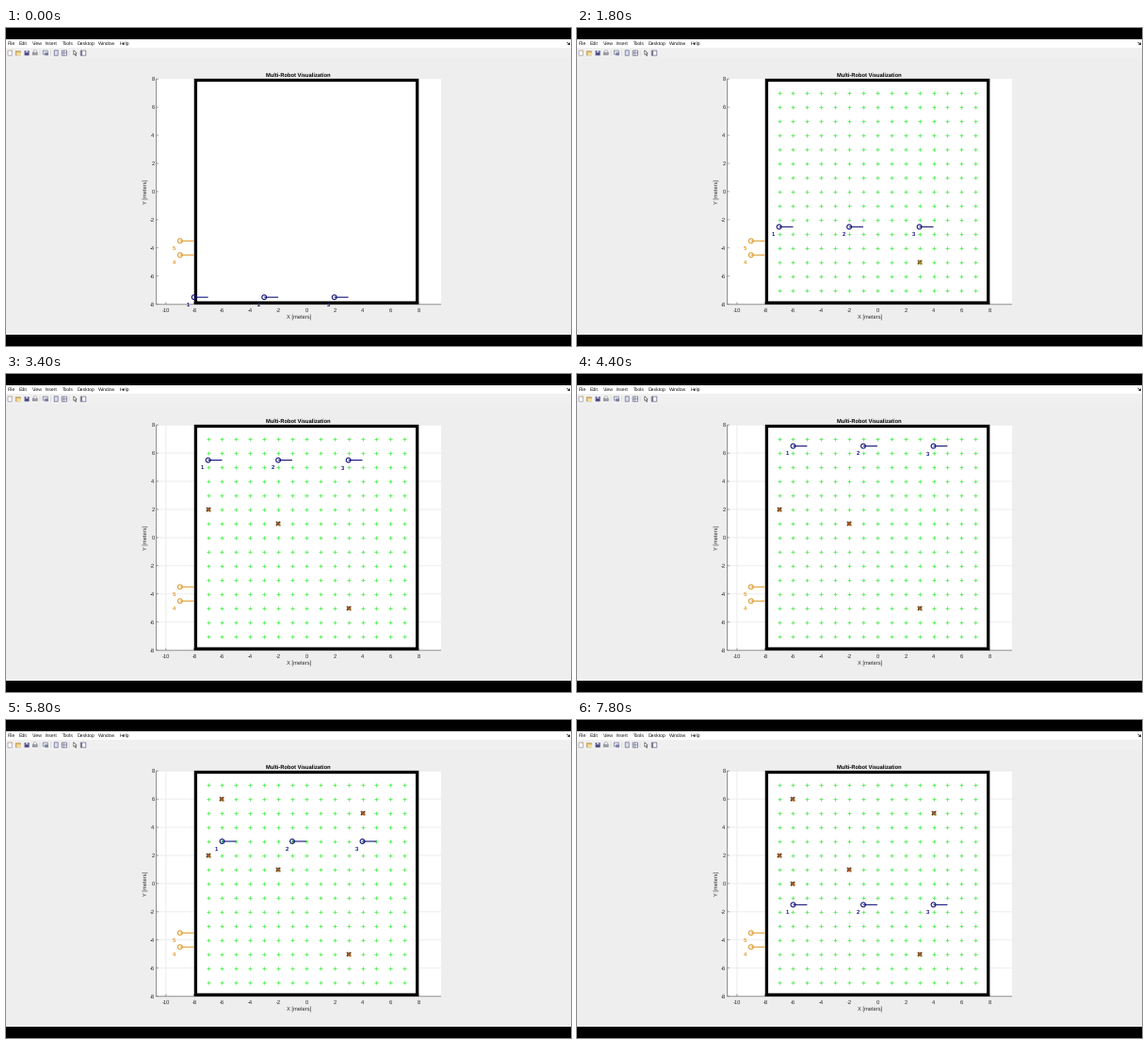
Write a matplotlib script that moves like this. It is 600x338 px and loops after 8000 ms.

```python
import matplotlib.pyplot as plt
from matplotlib.animation import FuncAnimation
from matplotlib.patches import Circle, Polygon, Rectangle

W, H, DPI = 600, 338, 64
PT = 72 / DPI  # points per pixel
FRAMES, STEP = 40, 200

NAVY, ORANGE, GREEN = "#12127a", "#e09d33", "#62f062"
PANEL, GRID, AXIS = "#eeeeee", "#e9e9e9", "#777777"
INK = "#2b2b2b"
LEFT, RIGHT, TOP, BOTTOM = 159.4, 462, 54, 293.8

plt.rcParams["text.hinting"] = "none"
plt.rcParams["font.family"] = "Liberation Sans"

fig = plt.figure(figsize=(W / DPI, H / DPI), dpi=DPI, facecolor=PANEL)
ax = fig.add_axes([0, 0, 1, 1])
ax.set_xlim(0, W)
ax.set_ylim(H, 0)
ax.axis("off")


def px(x):
    return 318.9 + 14.9 * x


def py(y):
    return 173.9 - 14.97 * y


def rect(x0, y0, x1, y1, color, edge="none", lw=0, z=1):
    ax.add_patch(Rectangle((x0, y0), x1 - x0, y1 - y0, facecolor=color,
                           edgecolor=edge, lw=lw * PT, zorder=z, snap=False))


def line(xs, ys, color, lw=1.0, z=2):
    return ax.plot(xs, ys, color=color, lw=lw * PT, zorder=z,
                   solid_capstyle="butt", snap=False)[0]


def marks(xs, ys, marker, size, lw, color, z):
    return ax.plot(xs, ys, ls="", marker=marker, ms=size * PT, mew=lw * PT,
                   color=color, zorder=z, snap=False)[0]


def text(x, y, s, size, color=INK, ha="center", va="baseline", z=4, **kw):
    return ax.text(x, y, s, fontsize=size * PT, color=color, ha=ha, va=va,
                   zorder=z, **kw)


def draw_window():
    rect(0, 0, W, 12, "black")
    rect(0, 326, W, H, "black")
    rect(0, 12, W, 21, "white")
    rect(0, 21, W, 32, "#f0f0f0")
    menus = {"File": 2, "Edit": 14, "View": 28, "Insert": 42, "Tools": 60,
             "Desktop": 76, "Window": 98, "Help": 121}
    for name, x in menus.items():
        text(x, 18.4, name, 5.15, "#111111", ha="left")
    line([595.5, 598], [15, 17], "#333333", 0.8)
    ax.add_patch(Polygon([(598.6, 15), (598.6, 17.8), (596, 17.8)],
                         color="#333333", lw=0))


def draw_toolbar():
    edge = "#77758f"
    for x in (36, 47.5, 67):
        line([x, x], [23.5, 29.5], "#d4d4d4", 0.7)
    # new, open, save, print
    rect(2, 24, 6.2, 29.2, "white", "#9492a8", 0.7)
    rect(5, 23.4, 7, 25.2, "#e5bd78")
    rect(10.2, 24.6, 15.4, 29, "#dcb866", "#a58a55", 0.5)
    rect(11.4, 26.2, 16, 29, "#f4de9c")
    rect(19.6, 24, 24.6, 29.2, "#504f86")
    rect(20.8, 24.2, 23.4, 26, "#ccd0e8")
    rect(28.2, 25.8, 33.2, 28.6, "#a3a2ac", "#77767f", 0.5)
    rect(29.2, 23.8, 32.2, 26, "white", "#8e8d96", 0.5)
    # preview, page, list
    rect(39.2, 24, 44.2, 28, "#dfe3f0", edge, 0.7)
    rect(41.2, 26.2, 45, 29.2, "#7c80a4")
    rect(51.2, 23.8, 55.2, 29.2, "#d8e0f6", edge, 0.8)
    rect(59.2, 24, 64.4, 29.2, "#e9e9f5", edge, 0.8)
    line([59.2, 64.4], [26.6, 26.6], edge, 0.7)
    line([61.2, 61.2], [24, 29.2], edge, 0.7)
    # pointer, side panel
    ax.add_patch(Polygon([(71.8, 23.6), (71.8, 28.4), (72.9, 27.5),
                          (74, 29.6), (74.7, 29.3), (73.8, 27.2),
                          (75.2, 27)], facecolor="white",
                         edgecolor="#444444", lw=0.6 * PT, zorder=2))
    rect(79.2, 24, 84.8, 29.2, "#f4f5fb", edge, 0.8)
    rect(79.2, 24, 81, 29.2, edge)


def draw_plot():
    rect(LEFT, TOP, RIGHT, BOTTOM, "white")
    line([LEFT, LEFT], [TOP, BOTTOM], AXIS, 0.8, 3)
    line([LEFT, RIGHT], [BOTTOM, BOTTOM], AXIS, 0.8, 3)
    for v in range(-10, 9, 2):
        x = px(v)
        line([x, x], [BOTTOM, BOTTOM - 2.5], AXIS, 0.7, 3)
        text(x + 0.3, 301.7, str(v), 5.7)
    for v in range(-8, 9, 2):
        y = py(v)
        line([LEFT, LEFT + 2.5], [y, y], AXIS, 0.7, 3)
        text(157.5, y + 2.2, str(v), 5.7, ha="right")
    text(310.8, 51.5, "Multi-Robot Visualization", 5.7, "black",
         weight="bold")
    text(310.7, 308.9, "X [meters]", 5.75)
    text(148, 174, "Y [meters]", 5.75, va="center", rotation=90)
    ax.add_patch(Rectangle((201.4, 55.5), 235.3, 236.6, facecolor="white",
                           edgecolor="black", lw=3.3 * PT, zorder=3,
                           joinstyle="miter", snap=False))


class Robot:
    def __init__(self, label, color):
        self.ring = Circle((0, 0), 2.4, fill=False, ec=color,
                           lw=1.1 * PT, zorder=6)
        ax.add_patch(self.ring)
        self.heading = line([], [], color, 1.1, 6)
        self.label = text(0, 0, label, 5.8, color, z=6, weight="bold")

    def move(self, x, y):
        cx, cy = px(x), py(y)
        self.ring.center = cx, cy
        self.heading.set_data([cx, px(x + 1)], [cy, cy])
        self.label.set_position((cx - 6, cy + 9.9))


def fleet_pose(n):
    """Position of the first scout; the others keep a fixed spacing."""
    if n < 5:
        return -8, -7.5
    if n <= 18:
        return -7, n - 11.5
    if n <= 21:
        return (-5 if n == 20 else -6), 7
    pause = 1 if n >= 36 else 0
    return -6, 6.5 - 0.5 * (n - 22 - pause)


draw_window()
draw_toolbar()
draw_plot()

# grid shows only outside the walled map
grid = [line([px(-10)] * 2, [TOP, BOTTOM], GRID, 0.8, 2)]
for v in range(-6, 9, 2):
    grid.append(line([LEFT, RIGHT], [py(v)] * 2, GRID, 0.8, 2))

cell_x, cell_y = zip(*[(px(i), py(j))
                       for i in range(-7, 8) for j in range(-7, 8)])
dots = [marks(cell_x, cell_y, "+", 3.8, 0.9, GREEN, 4),
        marks(cell_x, cell_y, "o", 2.0, 0, GREEN, 4)]

# x, y and the step at which each find appears
FINDS = [(3, -5, 7), (-2, 1, 13), (-7, 2, 14),
         (-6, 6, 24), (4, 5, 26), (-6, 0, 36)]
crosses = []
for x, y, start in FINDS:
    outer = marks(px(x), py(y), "x", 4.2, 1.7, "#4a2c14", 5)
    inner = marks(px(x), py(y), "x", 3.4, 0.8, "#d8682c", 5)
    crosses.append((start, outer, inner))

scouts = [Robot(str(k + 1), NAVY) for k in range(3)]
for name, y in (("5", -3.5), ("4", -4.5)):
    helper = Robot(name, ORANGE)
    helper.move(-9, y)


def update(n):
    x, y = fleet_pose(n)
    for k, scout in enumerate(scouts):
        scout.move(x + 5 * k, y)
    for d in dots:
        d.set_visible(n >= 5)
    for g in grid:
        g.set_visible(n >= 15)
    for start, outer, inner in crosses:
        outer.set_visible(n >= start)
        inner.set_visible(n >= start)
        inner.set_color("#e0a820" if n < 13 else "#d8682c")
    return []


anim = FuncAnimation(fig, update, frames=FRAMES, init_func=lambda: update(0),
                     interval=STEP, repeat=True, repeat_delay=0, blit=False)
plt.show()
```
